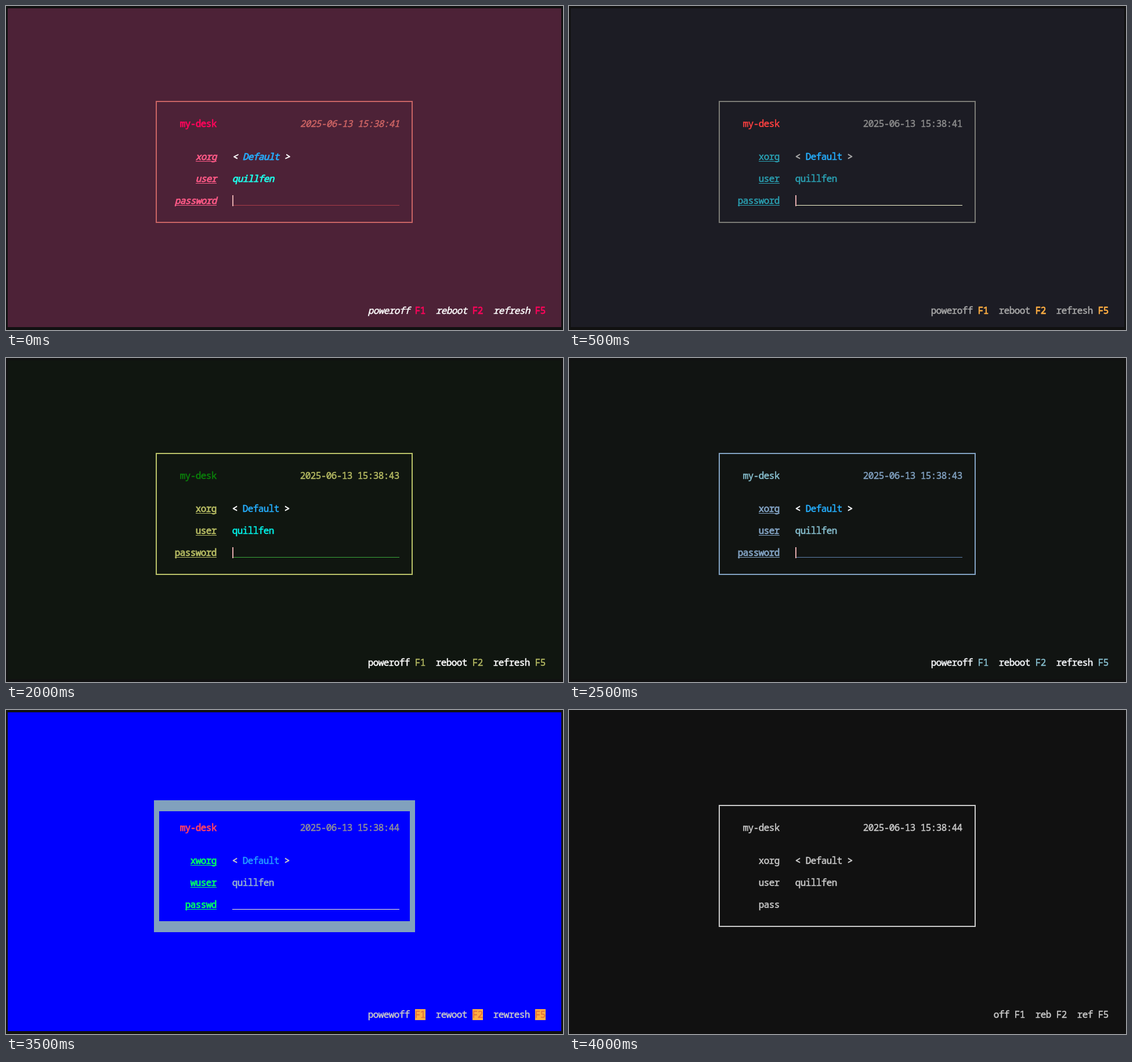
These frames come from a looping animation (960x560 px, 4500 ms). An HTML page with a canvas:

```html
<!DOCTYPE html>
<html lang="en">
<head>
<meta charset="utf-8">
<title>Login screen themes</title>
<style>
  html, body { margin: 0; width: 100%; height: 100%; overflow: hidden; background: #111; }
  canvas { display: block; }
</style>
</head>
<body>
<canvas id="stage" width="960" height="560"></canvas>
<script>
const ctx = document.getElementById('stage').getContext('2d');
const HOLD = 500;
const CELL = 9, LINE = 19;
const LABEL_END = 363, FIELD = 390, RIGHT = 678, KEYS_END = 930;
const HOST = 'my-desk', USER = 'quillfen';

const base = {
  bg: '#111111', fg: '#c8c8c8', session: '#25afff', cursor: true,
  labels: ['xorg', 'user', 'password'], actions: ['poweroff', 'reboot', 'refresh'],
  underline: true, labelStyle: '', textStyle: '', hostStyle: '', keyStyle: ''
};
const grey = '#c8c8c8';
const plain = { cursor: false, underline: false, host: grey, user: grey, session: grey, key: grey };
const slate = { bg: '#1c1c24', fg: '#a8a8a8', box: '#7a7a75', date: '#8c8c8c',
  input: '#f5f5cd', key: '#ffae42', keyStyle: 'bold' };
const slanted = { labelStyle: 'italic', textStyle: 'italic', hostStyle: 'italic', keyStyle: 'italic bold' };

const themes = [
  { bg: '#4d2237', fg: '#ffffff', box: '#c86464', date: '#cd6464', host: '#fa055a', hostStyle: 'bold',
    label: '#ff5a87', labelStyle: 'italic bold', textStyle: 'italic', fieldStyle: 'italic bold',
    user: '#1effeb', input: '#a83c48', key: '#fa055a', keyStyle: 'bold', second: 41 },
  { ...slate, host: '#ff4040', label: '#2aa1b3', user: '#2aa1b3', second: 41 },
  { ...slate, ...slanted, host: '#c4b28a', label: '#8ba4b0', user: '#b6927b', second: 42 },
  { ...slate, ...slanted, host: '#c8a064', label: '#7081a5', user: '#d2864f', second: 42 },
  { bg: '#101610', fg: '#ffffff', box: '#b8c068', date: '#b5ba62', host: '#0a800a',
    label: '#b5ba62', labelStyle: 'bold', user: '#00f5eb', input: '#3aa53a', key: '#b5ba62', second: 43 },
  { bg: '#111412', fg: '#f5f7fa', box: '#81a1c1', date: '#81a1c1', host: '#88c0d0',
    label: '#81a1c1', labelStyle: 'bold', user: '#88c0d0', input: '#5e81ac', key: '#88c0d0', second: 43 },
  plain,
  { bg: '#0000ff', block: '#81a1bd', date: '#909098', host: '#ff4064', hostStyle: 'bold',
    label: '#00ff64', labelStyle: 'bold', user: '#9ab8cc', session: '#259fff', input: '#f5f5cd',
    key: '#e2703a', keyBg: '#ffae42', cursor: false, second: 44,
    labels: ['xworg', 'wuser', 'passwd'], actions: ['powewoff', 'rewoot', 'rewresh'] },
  { ...plain, box: grey, date: grey, label: grey, second: 44,
    labels: ['xorg', 'user', 'pass'], actions: ['off', 'reb', 'ref'] }
].map(theme => ({ ...base, ...theme }));

const rowTop = row => 4 + LINE * row;
const widthOf = text => text.length * CELL;

function rect(color, x, y, w, h) {
  ctx.fillStyle = color;
  ctx.fillRect(x, y, w, h);
}

// Each character is centred in its terminal cell; a thin outline sets the weight.
function write(text, x, row, color, style = '') {
  const slant = style.includes('italic') ? 'italic' : 'normal';
  ctx.font = `${slant} 16px "Noto Sans Mono", "DejaVu Sans Mono", monospace`;
  ctx.textAlign = 'center';
  ctx.fillStyle = ctx.strokeStyle = color;
  ctx.lineWidth = style.includes('bold') ? 0.8 : 0.5;
  ctx.lineJoin = 'round';
  [...text].forEach((char, i) => {
    const centre = x + (i + 0.5) * CELL, baseline = rowTop(row) + 15;
    ctx.fillText(char, centre, baseline);
    ctx.strokeText(char, centre, baseline);
  });
}

function drawFrame(theme) {
  if (theme.block) {
    rect(theme.block, 255, 156, 450, 228);
    rect(theme.bg, 264, 175, 432, 190);
  }
  if (theme.box) {
    ctx.strokeStyle = theme.box;
    ctx.lineWidth = 2;
    ctx.lineJoin = 'miter';
    ctx.strokeRect(259, 165, 441, 209);
  }
}

function drawFields(theme) {
  const style = theme.fieldStyle || theme.textStyle;
  write(HOST, LABEL_END - widthOf(HOST), 10, theme.host, theme.hostStyle);
  if (theme.date) {
    const date = `2025-06-13 15:38:${theme.second}`;
    write(date, RIGHT - widthOf(date), 10, theme.date, theme.textStyle);
  }
  if (theme.label) theme.labels.forEach((label, i) => {
    const row = 13 + 2 * i, width = widthOf(label);
    write(label, LABEL_END - width, row, theme.label, theme.labelStyle);
    if (theme.underline) rect(theme.label, LABEL_END - width, rowTop(row) + 17, width, 1);
  });
  write('<', FIELD, 13, theme.fg, style + ' bold');
  write('Default', FIELD + 2 * CELL, 13, theme.session, style);
  write('>', FIELD + 10 * CELL, 13, theme.fg, style + ' bold');
  write(USER, FIELD, 15, theme.user, style);
  if (theme.input) rect(theme.input, FIELD, rowTop(17) + 17, RIGHT - FIELD, 1);
  if (theme.cursor) rect('#e0a8aa', FIELD, rowTop(17), 2, LINE);
}

function drawKeys(theme) {
  let x = KEYS_END - widthOf(theme.actions.map(action => action + ' F0').join('  '));
  theme.actions.forEach((action, i) => {
    write(action, x, 27, theme.fg, theme.textStyle);
    x += widthOf(action) + CELL;
    if (theme.keyBg) rect(theme.keyBg, x, rowTop(27), 2 * CELL, LINE);
    write(['F1', 'F2', 'F5'][i], x, 27, theme.key, theme.keyStyle);
    x += 4 * CELL;
  });
}

function draw() {
  const theme = themes[Math.floor(performance.now() / HOLD) % themes.length];
  rect('#111111', 0, 0, 960, 560);
  rect(theme.bg, 3, 4, 954, 551);
  drawFrame(theme);
  drawFields(theme);
  drawKeys(theme);
  requestAnimationFrame(draw);
}
draw();
</script>
</body>
</html>
```
